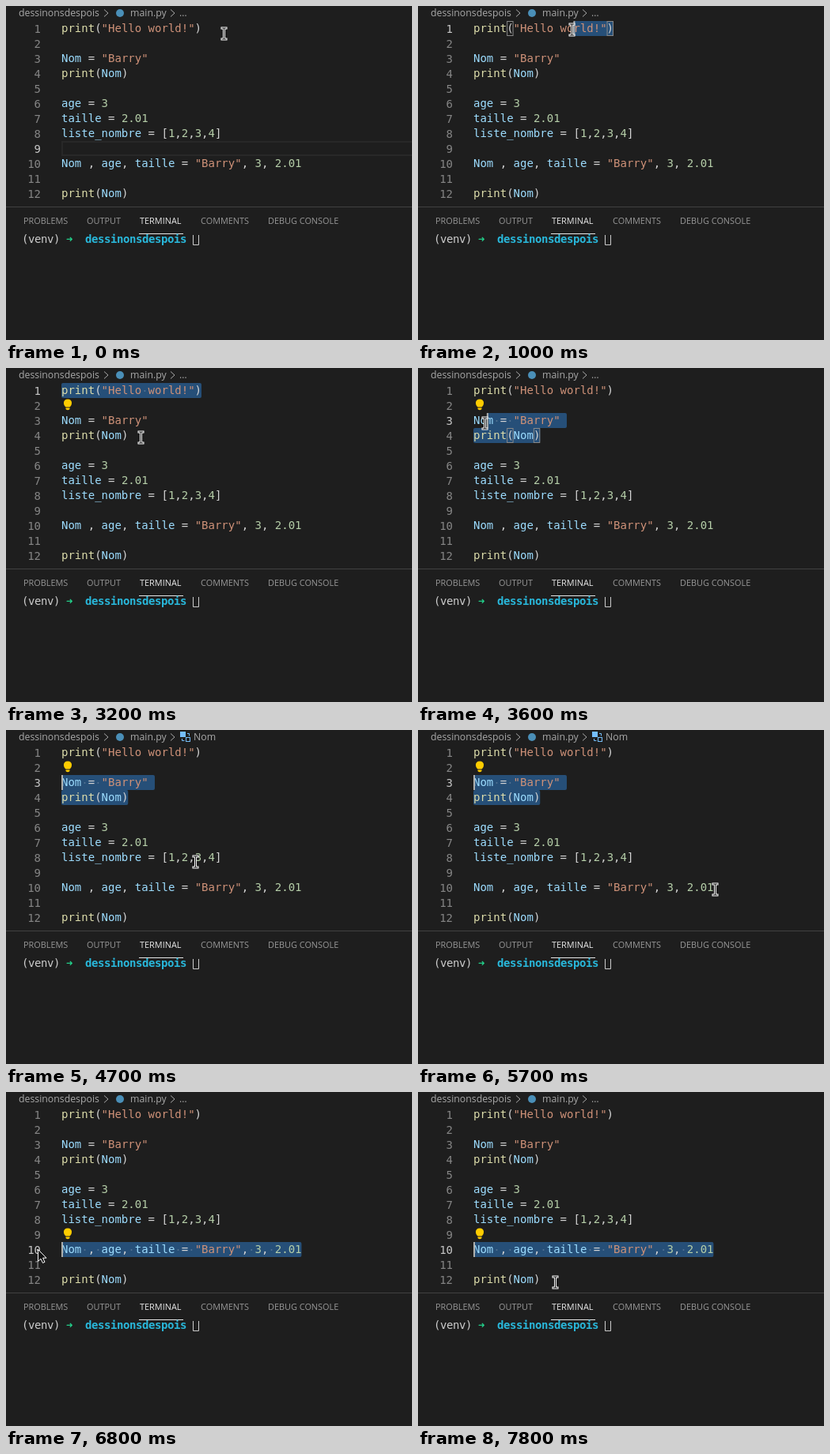
Write an HTML page that moves like this. It is 513x423 px and loops after 8 s.

```html
<!DOCTYPE html>
<html lang="fr">
<head>
<meta charset="utf-8">
<style>
  html, body { margin: 0; width: 100%; height: 100%; overflow: hidden; background: #1e1e1e; }
  svg { display: block; }
  text { white-space: pre; }
  .code, .term { font: 14px "DejaVu Sans Mono", monospace; }
  .term { fill: #ccc; letter-spacing: -.43px; }
  .crumb { font: 12.3px "Open Sans", sans-serif; fill: #a9a9a9; }
  .tab { font: 10.9px "Open Sans", sans-serif; fill: #979797; }
  .tab.on { fill: #e7e7e7; }
  .line { fill: none; stroke: #a9a9a9; }
</style>
</head>
<body>
<svg width="513" height="423" viewBox="0 0 513 423">
  <g id="back"></g>
  <g class="crumb">
    <text x="16" y="13">dessinonsdespois</text>
    <path class="line" d="M124 4.5l5 4.5-5 4.5M208 4.5l5 4.5-5 4.5"/>
    <circle cx="144" cy="9" r="5" fill="#4a8fb8"/>
    <text x="157" y="13">main.py</text>
    <text id="dots" x="219" y="13">…</text>
    <g id="symbol" stroke="#75beff" fill="none">
      <rect x="220.5" y="2.5" width="6" height="6" fill="#75beff"/>
      <path d="M229 4.5h2.500v3M222.500 11v2.500h3"/>
      <rect x="227.5" y="9.5" width="5" height="5"/>
      <text x="237" y="13" fill="#a9a9a9" stroke="none">Nom</text>
    </g>
  </g>
  <g id="code" class="code"></g>
  <path d="M0 254.5H513" stroke="#414141"/>
  <g>
    <text class="tab" x="22" y="276">PROBLEMS</text>
    <text class="tab" x="102" y="276">OUTPUT</text>
    <text class="tab on" x="169" y="276">TERMINAL</text>
    <text class="tab" x="246" y="276">COMMENTS</text>
    <text class="tab" x="331" y="276">DEBUG CONSOLE</text>
    <path d="M168 288.5H224" stroke="#e7e7e7"/>
  </g>
  <g class="term">
    <text x="20" y="300">(venv)</text>
    <text x="76" y="300" fill="#23d18b" font-weight="bold">➜</text>
    <text x="100" y="300" fill="#29b8db" font-weight="bold">dessinonsdespois</text>
    <path d="M236.5 290V302.5h7V290" fill="none" stroke="#ccc"/>
  </g>
  <g id="front"></g>
  <g id="bulb" fill="#fc0">
    <path d="M-2.500 2C-6 -.5 -6.500 -8 0 -8S6 -.5 2.500 2z"/>
    <path d="M-2.500 3h5v1.500q-2.500 2.500-5 0z"/>
  </g>
  <path id="arrow" d="M.5 .5V15.500L4 12.300L6.500 17.500L9 16.300L6.600 11.200H11z" fill="#111" stroke="#fff" stroke-linejoin="round"/>
  <g id="beam" fill="none">
    <path d="M-4 -7H4M-4 7H4M0 -7V7" stroke="#fff" stroke-width="3"/>
    <path d="M-3 -7H3M-3 7H3M0 -7V7" stroke="#111"/>
  </g>
</svg>
<script>
const LOOP = 8000, LEFT = 70, TOP = 19, ROW = 19, CHAR = 8.428;
const lines = [
  'print("Hello world!")', '', 'Nom = "Barry"', 'print(Nom)', '',
  'age = 3', 'taille = 2.01', 'liste_nombre = [1,2,3,4]', '',
  'Nom , age, taille = "Barry", 3, 2.01', '', 'print(Nom)'
];

// Each drag runs backwards, from `after` px past the end of line `last`
// to `before` px ahead of line `first`; the mouse then leaves on a bent path.
const drags = [
  { press: 700, release: 1700, settle: 2100, leave: 2250, last: 0, first: 0, after: 32, before: 4, bend: [40, 0] },
  { press: 3300, release: 3750, settle: 4000, leave: 4100, last: 3, first: 2, after: 17, before: 4, bend: [0, 26] },
  { press: 5900, release: 6550, settle: 6800, leave: 7000, last: 9, first: 9, after: 6, before: 30, bend: [240, -15] }
];
const goal = { press: 7800, last: 11, after: 20 };

const $ = id => document.getElementById(id);
const colX = col => LEFT + col * CHAR;
const rowY = row => TOP + row * ROW;
const rect = (x, y, w, h, attrs) => `<rect x="${x}" y="${y}" width="${w}" height="${h}" ${attrs}/>`;
const show = (id, on) => $(id).style.display = on ? '' : 'none';
const place = (id, x, y) => $(id).setAttribute('transform', `translate(${x} ${y})`);

function colour(token) {
  if (token[0] === '"') return '#ce9178';
  if (token === 'print') return '#dcdcaa';
  if (/^\d/.test(token)) return '#b5cea8';
  return /^\w/.test(token) ? '#9cdcfe' : '#d4d4d4';
}

$('code').innerHTML = lines.map((line, i) => {
  const y = rowY(i) + 14;
  const spans = (line.match(/"[^"]*"|[\w.]+|[^\w"]+/g) || [])
    .map(token => `<tspan fill="${colour(token)}">${token}</tspan>`).join('');
  return `<text class="number" x="44" y="${y + 1}" text-anchor="end">${i + 1}</text>` +
    `<text x="${LEFT}" y="${y}">${spans}</text>`;
}).join('');
const numbers = document.querySelectorAll('.number');

const lastBy = (event, t) => drags.filter(d => d[event] <= t).pop();
const pressPoint = d => [colX(lines[d.last].length) + d.after, rowY(d.last) + 12.5];
const releasePoint = d => [LEFT - d.before, rowY(d.first) + 8.5];

function glide(from, to, start, end, t, bend = [0, 0]) {
  const k = Math.max(0, Math.min(1, (t - start) / (end - start)));
  const eased = 1 - (1 - k) ** 2;
  return from.map((v, i) => v + (to[i] - v) * eased + bend[i] * Math.sin(Math.PI * eased));
}

function mouseAt(t) {
  if (t < 100) return [276, 35];
  const drag = lastBy('press', t);
  if (!drag) return pressPoint(drags[0]);
  if (t < drag.leave) return glide(pressPoint(drag), releasePoint(drag), drag.press + 100, drag.release, t);
  const next = drags[drags.indexOf(drag) + 1] || goal;
  return glide(releasePoint(drag), pressPoint(next), drag.leave, next.press, t, drag.bend);
}

function textPosition(t) {
  const [x, y] = mouseAt(t);
  const row = Math.floor((y - TOP) / ROW);
  const col = Math.round((x - LEFT) / CHAR);
  return { row, col: Math.max(0, Math.min(lines[row].length, col)) };
}

function selection(from, to) {
  let out = '';
  for (let row = from.row; row <= to.row; row++) {
    const start = row === from.row ? from.col : 0;
    const end = row === to.row ? to.col : lines[row].length + 1;
    out += rect(colX(start), rowY(row), (end - start) * CHAR, ROW, 'rx="2" fill="#264f78"');
    for (let col = start; col < end; col++)
      if (lines[row][col] === ' ')
        out += `<circle cx="${colX(col + .5)}" cy="${rowY(row) + 10}" r="1" fill="#e3e4e2" opacity=".25"/>`;
  }
  return out;
}

function bracketBoxes(row) {
  return ['(', ')'].map(bracket =>
    rect(colX(lines[row].indexOf(bracket)) + .5, rowY(row) + .5, CHAR - 1, ROW - 1, 'fill="none" stroke="#888"')).join('');
}

function draw(t) {
  const drag = lastBy('press', t), settled = lastBy('settle', t);
  let caret = { row: 8, col: 0 }, back = '', front = '', selected = false;

  if (drag) {
    const anchor = textPosition(drag.press);
    caret = textPosition(Math.min(t, drag.release));
    selected = caret.row !== anchor.row || caret.col !== anchor.col;
    if (selected) back += selection(caret, anchor);
    // the same text on the last line lights up
    if (selected && caret.row === 3)
      back += rect(colX(caret.col), rowY(11), (anchor.col - caret.col) * CHAR, ROW, 'fill="#add6ff" opacity=".15"');
    if (t < drag.release && lines[anchor.row].endsWith(')')) back += bracketBoxes(anchor.row);
    const still = Math.max(0, t - drag.release + 100);
    if (still % 1000 < 500) front += rect(colX(caret.col), rowY(caret.row), 2, ROW, 'fill="#aeafad"');
  }
  if (!selected) back += rect(71, rowY(caret.row) + 1, 500, 17, 'fill="none" stroke="#282828" stroke-width="2"');

  $('back').innerHTML = back;
  $('front').innerHTML = front;
  numbers.forEach((n, i) => n.setAttribute('fill', i === caret.row ? '#c6c6c6' : '#858585'));

  const inSymbol = !!settled && lines[settled.first].startsWith('Nom =');
  show('symbol', inSymbol);
  show('dots', !inSymbol);
  show('bulb', settled);
  // the bulb sits on the empty line beside the selection
  if (settled) place('bulb', 78, rowY(settled.first ? settled.first - 1 : 1) + 9.5);

  const [x, y] = mouseAt(t).map(Math.round);
  show('arrow', x < LEFT);
  show('beam', x >= LEFT);
  if (x < LEFT) place('arrow', x, y);
  else place('beam', x - .5, y);
}

function tick() {
  draw(Math.floor(performance.now() % LOOP / 100) * 100);
  requestAnimationFrame(tick);
}
tick();
</script>
</body>
</html>
```
